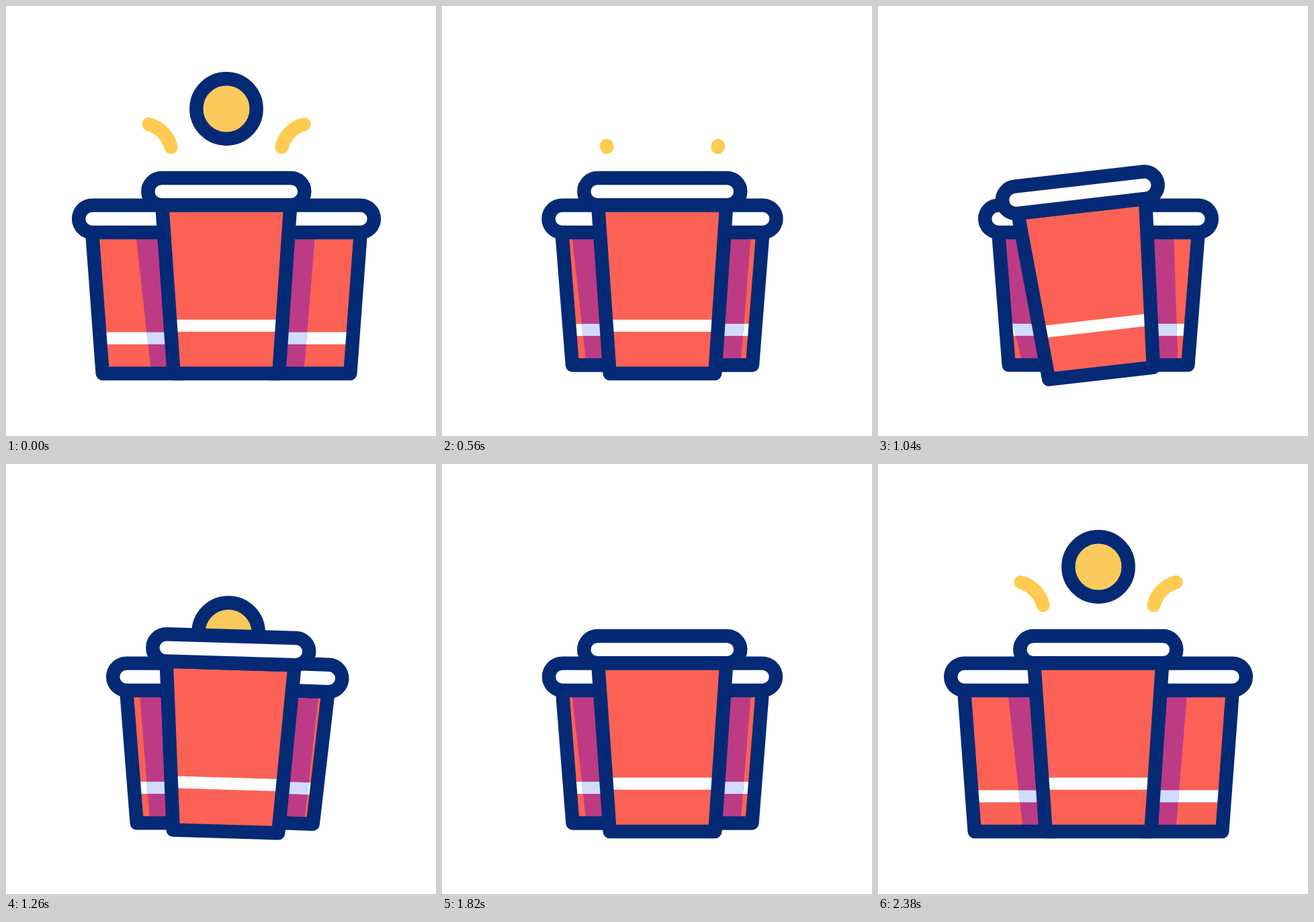
Recreate the animation shown at these times as an HTML page with a canvas. Size 640 by 640 pixels, loop 2.4 s.

```html
<!DOCTYPE html>
<html>
<head>
<meta charset="utf-8">
<style>
html, body { margin: 0; width: 100%; height: 100%; overflow: hidden; background: #fff; }
canvas { display: block; }
</style>
</head>
<body>
<canvas id="stage" width="640" height="640"></canvas>
<script>
const ctx = document.getElementById('stage').getContext('2d');
const LOOP = 2400;
const NAVY = '#042a76', RED = '#fb6255', PURPLE = '#bd3b85', PALE = '#d1dbfd';
const BALL = '#fbc95c', SPARK = '#ffcb50';

// Eased keyframes: [time, value] pairs
const TILT = {
  front: [[600, 0], [1000, -7.3], [1200, 0], [1400, 8], [1800, 0]],
  left: [[1400, 0], [1600, -14], [1800, 0]],
  right: [[1200, 0], [1400, 10], [1600, 0]]
};
const GATHER = [[80, 0], [600, 1], [1800, 1], [2360, 0]];
const SPARKLE = [[300, 1], [600, 0], [2060, 0], [2360, 1]];
const DROP = [[1800, -60], [2380, 153]];

function track(keys, t) {
  if (t <= keys[0][0]) return keys[0][1];
  for (let i = 1; i < keys.length; i++) {
    const [t0, a] = keys[i - 1], [t1, b] = keys[i];
    if (t < t1) return a + (b - a) * (1 - Math.cos(Math.PI * (t - t0) / (t1 - t0))) / 2;
  }
  return keys[keys.length - 1][1];
}

function polygon(points) {
  const path = new Path2D();
  points.forEach(([x, y]) => path.lineTo(x, y));
  path.closePath();
  return path;
}

const SHADOW = polygon([[190.7, 317], [462, 317], [441, 575], [219.2, 575]]);
const FRONT = polygon([[232.2, 296.3], [423.3, 296.3], [406.3, 547], [249.7, 547]]);

function rotateAbout(x, y, degrees) {
  ctx.translate(x, y);
  ctx.rotate(degrees * Math.PI / 180);
  ctx.translate(-x, -y);
}

function outline(path, fill) {
  if (fill) {
    ctx.fillStyle = fill;
    ctx.fill(path);
  }
  ctx.strokeStyle = NAVY;
  ctx.lineWidth = 20.4;
  ctx.stroke(path);
}

function rim(x, y, width) {
  const path = new Path2D();
  path.roundRect(x, y, width, 40.3, 20.15);
  outline(path, '#fff');
}

function paint(color, stripe, stripeY) {
  ctx.fillStyle = color;
  ctx.fillRect(0, 0, 640, 640);
  ctx.fillStyle = stripe;
  ctx.fillRect(0, stripeY, 640, 18);
}

const tiltFront = t => rotateAbout(328, 512, track(TILT.front, t));

function sideCup(t, mirrored) {
  const p = track(GATHER, t);
  const dx = 51 * p, bottom = 547 - 12.6 * p, stripeY = 485.5 - 12.6 * p;
  const angle = mirrored ? -track(TILT.right, t) : track(TILT.left, t);
  const body = polygon([[128.2 + dx, 337], [278 + dx, 337], [263 + dx, bottom], [143.7 + dx, bottom]]);
  const place = () => {
    ctx.resetTransform();
    if (mirrored) ctx.transform(-1, 0, 0, 1, 656, 0);
    rotateAbout(237, 411, angle);
  };
  ctx.save();
  place();
  ctx.save();
  ctx.clip(body);
  paint(RED, '#fff', stripeY);
  ctx.resetTransform();
  tiltFront(t);
  ctx.clip(SHADOW);
  place();
  paint(PURPLE, PALE, stripeY);
  ctx.restore();
  outline(body);
  rim(108.2 + dx, 296.6, 190);
  ctx.restore();
}

function frontCup(t) {
  ctx.save();
  tiltFront(t);
  ctx.save();
  ctx.clip(FRONT);
  paint(RED, '#fff', 466.8);
  ctx.restore();
  outline(FRONT);
  rim(211.3, 256, 233);
  ctx.restore();
}

function ballPosition(t) {
  if (t < 1000) return [328, Math.min(420, 153 + 109 * (Math.max(0, t - 80) / 260) ** 2)];
  if (t < 1800) return [328 + 0.00082 * Math.max(0, t - 1200) ** 2, Math.min(420, 252 - 0.842 * (t - 1260))];
  return [328, track(DROP, t)];
}

function ball(t) {
  const path = new Path2D();
  path.arc(...ballPosition(t), 44.7, 0, 2 * Math.PI);
  outline(path, BALL);
}

// Arcs shrink toward their lower ends
function sparks(t) {
  const amount = track(SPARKLE, t);
  if (amount < 0.005) return;
  const r = 46, start = -0.23, sweep = -1.08;
  ctx.strokeStyle = SPARK;
  ctx.lineWidth = 20.4;
  ctx.lineCap = 'round';
  for (const side of [1, -1]) {
    ctx.save();
    ctx.translate(328, 0);
    ctx.scale(side, 1);
    ctx.beginPath();
    ctx.arc(-82.5 - r * Math.cos(start), 210 - r * Math.sin(start), r, start, start + sweep * amount, true);
    ctx.stroke();
    ctx.restore();
  }
}

function draw() {
  const t = performance.now() % LOOP;
  ctx.resetTransform();
  ctx.fillStyle = '#fff';
  ctx.fillRect(0, 0, 640, 640);
  ctx.lineJoin = 'round';
  sparks(t);
  sideCup(t, false);
  sideCup(t, true);
  ball(t);
  frontCup(t);
  requestAnimationFrame(draw);
}
draw();
</script>
</body>
</html>
```
